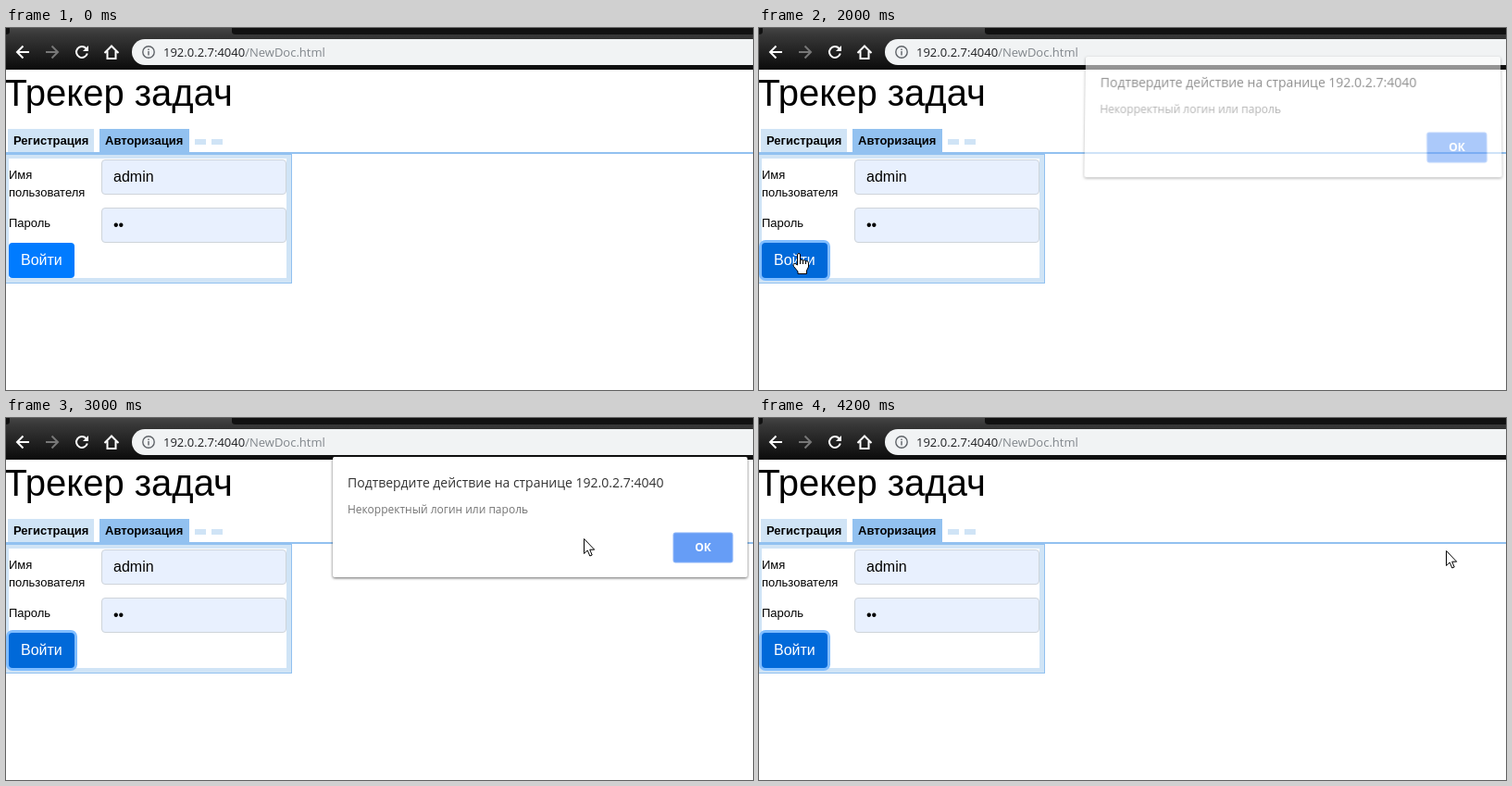
These frames come from a looping animation (807 px wide and 391 px high, 4.27 s). An HTML page:

```html
<!DOCTYPE html>
<html lang="ru">
<head>
<meta charset="utf-8">
<title>Трекер задач</title>
<style>
  html, body { margin: 0; width: 100%; height: 100%; overflow: hidden; background: #fff; }
  svg { position: absolute; left: 0; top: 0; width: 807px; height: 391px; overflow: hidden; }
  text { font-family: "Liberation Sans", Arial, sans-serif; font-size: 13px; white-space: pre; }
  .ui { font-family: "Open Sans", "Noto Sans", sans-serif; }
  .big { font-size: 16px; }
  .bold { font-weight: bold; }
  .icon { fill: none; stroke: #fff; stroke-width: 2; }
  .field { fill: #e8f0fe; stroke: #ced4da; }
  #dialog { transform-origin: 577px 107px; }
  .panel { filter: drop-shadow(0 1px 1.5px rgba(0,0,0,.6)); }
</style>
</head>
<body>
<svg viewBox="0 0 807 391">
  <defs>
    <linearGradient id="bar" x2="0" y2="1">
      <stop stop-color="#383838"/><stop offset="1" stop-color="#0b0b0b"/>
    </linearGradient>
    <linearGradient id="tab" x2="0" y2="1">
      <stop stop-color="#454545"/><stop offset="1" stop-color="#383838"/>
    </linearGradient>
  </defs>

  <!-- browser bar -->
  <rect width="807" height="45" fill="#111"/>
  <rect y="7" width="807" height="38" fill="url(#bar)"/>
  <path d="M4 0H244V4Q244 7 248 7H0Q4 7 4 4Z" fill="url(#tab)"/>
  <g class="icon">
    <path d="M25 26H12M18.500 19.500L12 26L18.500 32.500"/>
    <path d="M43 26H56M49.500 19.500L56 26L49.500 32.500" stroke="#777"/>
    <path d="M86.500 22A6 6 0 1 0 87.800 27.500"/>
    <path d="M89 19V25H83Z" fill="#fff" stroke="none"/>
    <path d="M106.500 27L114 19.500L121.500 27M109.500 25V33H118.500V25"/>
  </g>
  <rect x="136" y="12" width="700" height="28" rx="14" fill="#f1f3f4"/>
  <g class="icon" stroke="#5f6368" style="stroke:#5f6368;stroke-width:1.4">
    <circle cx="154" cy="26" r="6.200"/>
    <path d="M154 25V29.500M154 22.500V24"/>
  </g>
  <text class="ui" x="170" y="31" fill="#202124">192.0.2.7:4040<tspan fill="#80868b">/NewDoc.html</tspan></text>

  <!-- page -->
  <text x="-1.500" y="84" style="font-size:40px">Трекер задач</text>
  <g fill="#d0e4f6">
    <rect x="2" y="109" width="93" height="25"/>
    <rect x="204" y="120" width="12" height="6"/>
    <rect x="222" y="120" width="12" height="6"/>
    <rect x="-.500" y="136.500" width="309" height="139" stroke="#92c1f0"/>
  </g>
  <path d="M101 109H198V134H807V136H0V134H101Z" fill="#92c1f0"/>
  <rect x="3" y="141" width="300" height="129" fill="#fff"/>
  <text class="bold" x="8" y="126">Регистрация</text>
  <text class="bold" x="107" y="126">Авторизация</text>
  <text x="3" y="163">Имя</text>
  <text x="3" y="182">пользователя</text>
  <text x="3" y="215">Пароль</text>
  <rect class="field" x="103.500" y="142.500" width="199" height="37" rx="3.500"/>
  <rect class="field" x="103.500" y="194.500" width="199" height="37" rx="3.500"/>
  <text class="big" x="116" y="166">admin</text>
  <text class="big" x="116" y="218">••</text>
  <rect id="ring" x="0" y="229" width="77" height="44" rx="7" fill="#80bdff"/>
  <rect id="login" x="3" y="232" width="71" height="38" rx="4"/>
  <text class="big" x="16" y="256" fill="#fff">Войти</text>
</svg>

<svg id="dialog" viewBox="0 0 807 391">
  <rect class="panel" x="353" y="42" width="448" height="130" rx="2" fill="#fff"/>
  <text class="ui" x="369" y="75" fill="#333" style="font-size:14px">Подтвердите действие на странице 192.0.2.7:4040</text>
  <text class="ui" x="369" y="103" fill="#757575" style="font-size:12px">Некорректный логин или пароль</text>
  <rect x="721" y="124" width="64" height="32" rx="2" fill="#669df6" stroke="#8bb4f8"/>
  <text class="ui bold" x="753" y="144" fill="#fff" text-anchor="middle" style="font-size:12px">ОК</text>
</svg>

<svg viewBox="0 0 807 391">
  <g id="cursor" fill="#fff" stroke="#000" stroke-linejoin="round">
    <path id="arrow" d="M.500 .500V16.500L4.200 13L6.800 19L9.200 18L6.700 12.200H11.700Z"/>
    <path id="hand" d="M-1.500 13V2Q-1.500 .500 0 .500T1.500 2V7.500Q3 6.500 4.500 8Q6 7 7.500 8.700Q10.500 8 10.500 11V15L8.500 19V22.500H-1V20L-5.500 14.500Q-7 12 -5 11.500Q-3.500 11.200 -1.500 13ZM1.500 7.500V12M4.500 8V12M7.500 8.700V12"/>
  </g>
</svg>

<script>
const LOOP = 4270, STEP = 1000 / 15, LAST = 63;
const $ = id => document.getElementById(id);
const clamp = v => Math.max(0, Math.min(1, v));
const show = (el, on) => { el.style.visibility = on ? "visible" : "hidden"; };

// step, x, y
const path = [
  [7, 795, 239], [9, 570, 293], [11, 340, 321], [12, 255, 317], [13, 190, 301],
  [14, 146, 284], [15, 117, 273], [17, 80, 260], [19, 57, 250], [21, 43, 243],
  [34, 43, 243], [36, 62, 239], [37, 85, 231], [39, 165, 203], [41, 310, 159],
  [42, 399, 135], [43, 485, 129], [45, 624, 130], [47, 696, 136], [49, 731, 140],
  [52, 742, 143], [LAST, 742, 143]
];

function cursorAt(n) {
  const i = Math.max(1, path.findIndex(p => p[0] >= n));
  const [a, x0, y0] = path[i - 1], [b, x1, y1] = path[i];
  const p = clamp((n - a) / (b - a));
  return [x0 + (x1 - x0) * p, y0 + (y1 - y0) * p];
}

function drawCursor(n) {
  const [x, y] = cursorAt(n);
  const isHand = n >= 18 && n < 42;
  $("cursor").setAttribute("transform", `translate(${Math.round(x)} ${Math.round(y)})`);
  show($("arrow"), n >= 7 && !isHand);
  show($("hand"), isHand);
}

function drawLogin(n) {
  const hover = clamp((n - 17) / 2);
  $("login").setAttribute("fill", `rgb(0,${123 - 18 * hover},${255 - 38 * hover})`);
  $("ring").setAttribute("opacity", clamp((n - 23) / 3));
}

function drawDialog(n) {
  const el = $("dialog");
  const opening = (1 - clamp((n - 29) / 3)) ** 2;
  const closing = clamp((n - 58) / 5) ** 4;
  const away = opening + closing;
  show(el, n >= 30 && n < LAST);
  el.style.opacity = clamp(1 - opening - 1.4 * closing);
  el.style.transform = away
    ? `translateY(${-25 * opening - 18 * closing}px) perspective(1000px) rotateX(${7 * away}deg) scale(${1 + .008 * away})`
    : "none";
}

function draw(now) {
  const n = Math.min(LAST, Math.floor((now % LOOP) / STEP + .06));
  drawCursor(n);
  drawLogin(n);
  drawDialog(n);
}

const start = performance.now();
function tick() {
  draw(performance.now() - start);
  requestAnimationFrame(tick);
}
tick();
</script>
</body>
</html>
```
